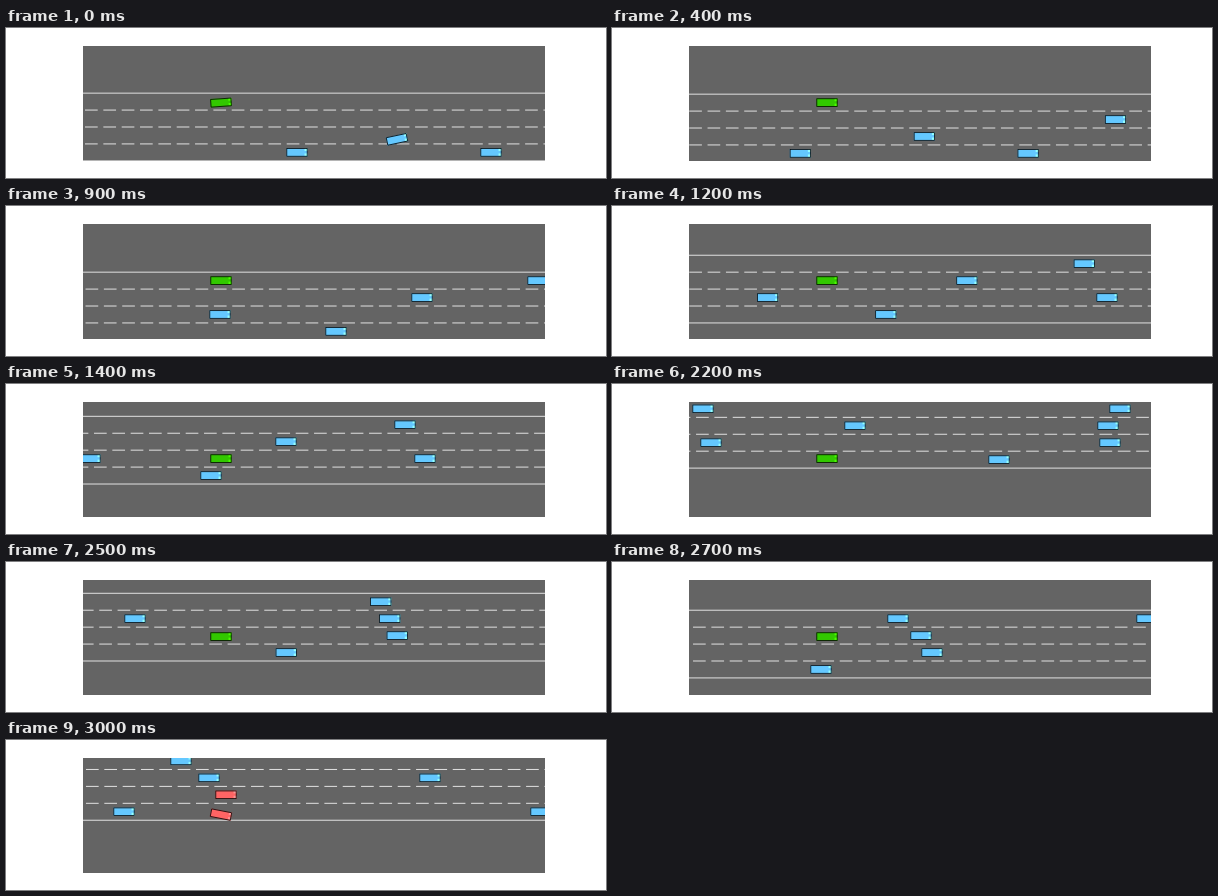
An HTML page with a canvas that plays this animation: 600 by 150 pixels, repeating every 3100 ms.

```html
<!DOCTYPE html>
<html>
<head>
<meta charset="utf-8">
<style>
html, body { margin: 0; width: 100%; height: 100%; overflow: hidden; background: #fff; }
canvas { display: block; }
</style>
</head>
<body>
<canvas id="stage" width="600" height="150"></canvas>
<script>
const ctx = document.getElementById('stage').getContext('2d');
const STEPS = 31, STEP_MS = 100;
const METRE = 4.235, LANE = 4 * METRE, DASH_GAP = 4.33 * METRE, DASH = 3 * METRE;
const ROAD = { x: 77, y: 18, w: 462, h: 115 };
const EGO = { x: 215, y: 74.6 };
const BLUE = [100, 200, 255], GREEN = [50, 200, 0], RED = [255, 100, 100];

// Lane of the followed car at each step
const egoLanes = '0000000000011222333332333221223';

// Each car: its lane, then [step, x] points
const cars = [
  { lane: 3, path: [[0, 291], [9, 60]] },
  { lane: 2, path: [[0, 391], [9, 214], [14, 84]], merging: true },
  { lane: 3, path: [[0, 485], [9, 330], [14, 205]] },
  { lane: 1, path: [[9, 416], [14, 280], [18, 125]] },
  { lane: 0, path: [[9, 532], [14, 399], [18, 246], [22, 91]] },
  { lane: 2, path: [[14, 419], [18, 263], [22, 99]] },
  { lane: 1, path: [[18, 399], [22, 243]] },
  { lane: 3, path: [[18, 531], [22, 387], [27, 209], [30, 118]] },
  { lane: 0, path: [[22, 508], [27, 286], [30, 175]] },
  { lane: 1, path: [[22, 496], [27, 309], [30, 203]] },
  { lane: 2, path: [[22, 498], [27, 320], [30, 220]], crashes: true },
  { lane: 0, path: [[27, 535], [30, 424]], moves: { step: 29, lane: 1 } },
  { lane: 3, path: [[30, 535]] }
];
const dashPath = [[0, 79], [9, 116.2], [14, 143], [18, 150], [22, 157.4], [27, 172.7], [30, 190]];

// Distance gained on the traffic; the speed rises at step 12
const gained = n => n < 12 ? 17.5 * n : 219.5 + 38 * (n - 12);

function along(path, n, pace) {
  const next = path.findIndex(p => p[0] >= n);
  if (next < 1) {
    const [n0, x0] = next < 0 ? path[path.length - 1] : path[0];
    return x0 + pace(n0) - pace(n);
  }
  const [a, xa] = path[next - 1], [b, xb] = path[next];
  return xa + (xb - xa) * (pace(n) - pace(a)) / (pace(b) - pace(a));
}

function egoLane(n) {
  if (n === STEPS - 1) return 3.17;
  const lane = +egoLanes[n], before = n ? +egoLanes[n - 1] : 1;
  return lane + 0.06 * (before - lane);
}

function drawCar(x, y, color, degrees = 0) {
  const l = 5 * METRE, w = 2 * METRE;
  ctx.save();
  ctx.translate(x, y);
  ctx.rotate(degrees * Math.PI / 180);
  ctx.fillStyle = `rgb(${color})`;
  ctx.fillRect(-l / 2, -w / 2, l, w);
  ctx.fillStyle = `rgb(${color.map(c => Math.min(255, c / 0.68))})`;
  for (const side of [-0.93, 0.24])
    ctx.fillRect(l / 2 - 0.72 * METRE, side * METRE, 0.72 * METRE, 0.6 * METRE);
  ctx.strokeStyle = '#000';
  ctx.lineWidth = 0.77;
  ctx.strokeRect(-l / 2 + 0.4, -w / 2 + 0.4, l - 0.8, w - 0.8);
  ctx.restore();
}

function drawRoad(top, phase) {
  ctx.fillStyle = '#646464';
  ctx.fillRect(ROAD.x, ROAD.y, ROAD.w, ROAD.h);
  ctx.fillStyle = '#fff';
  for (let i = 0; i <= 4; i++) {
    const y = top + i * LANE - 0.4;
    if (i % 4 === 0) ctx.fillRect(ROAD.x, y, ROAD.w, 0.8);
    else for (let x = ROAD.x - DASH_GAP + (phase - ROAD.x) % DASH_GAP; x < 540; x += DASH_GAP)
      ctx.fillRect(x, y, DASH, 0.8);
  }
}

function draw(n) {
  const top = EGO.y - (egoLane(n) + 0.5) * LANE;
  const crashed = n === STEPS - 1;
  ctx.clearRect(0, 0, 600, 150);
  ctx.save();
  ctx.beginPath();
  ctx.rect(ROAD.x, ROAD.y, ROAD.w, ROAD.h);
  ctx.clip();
  drawRoad(top, along(dashPath, n, k => k));
  for (const car of cars) {
    const merging = car.merging && n === 0;
    const lane = car.moves && n >= car.moves.step ? car.moves.lane : car.lane + (merging ? 0.23 : 0);
    drawCar(along(car.path, n, gained), top + (lane + 0.5) * LANE,
      car.crashes && crashed ? RED : BLUE, merging ? -12 : 0);
  }
  drawCar(EGO.x, EGO.y, crashed ? RED : GREEN, crashed ? 11 : n === 0 ? -4 : 0);
  ctx.restore();
}

function tick() {
  draw(Math.floor(performance.now() / STEP_MS) % STEPS);
  requestAnimationFrame(tick);
}
tick();
</script>
</body>
</html>
```
